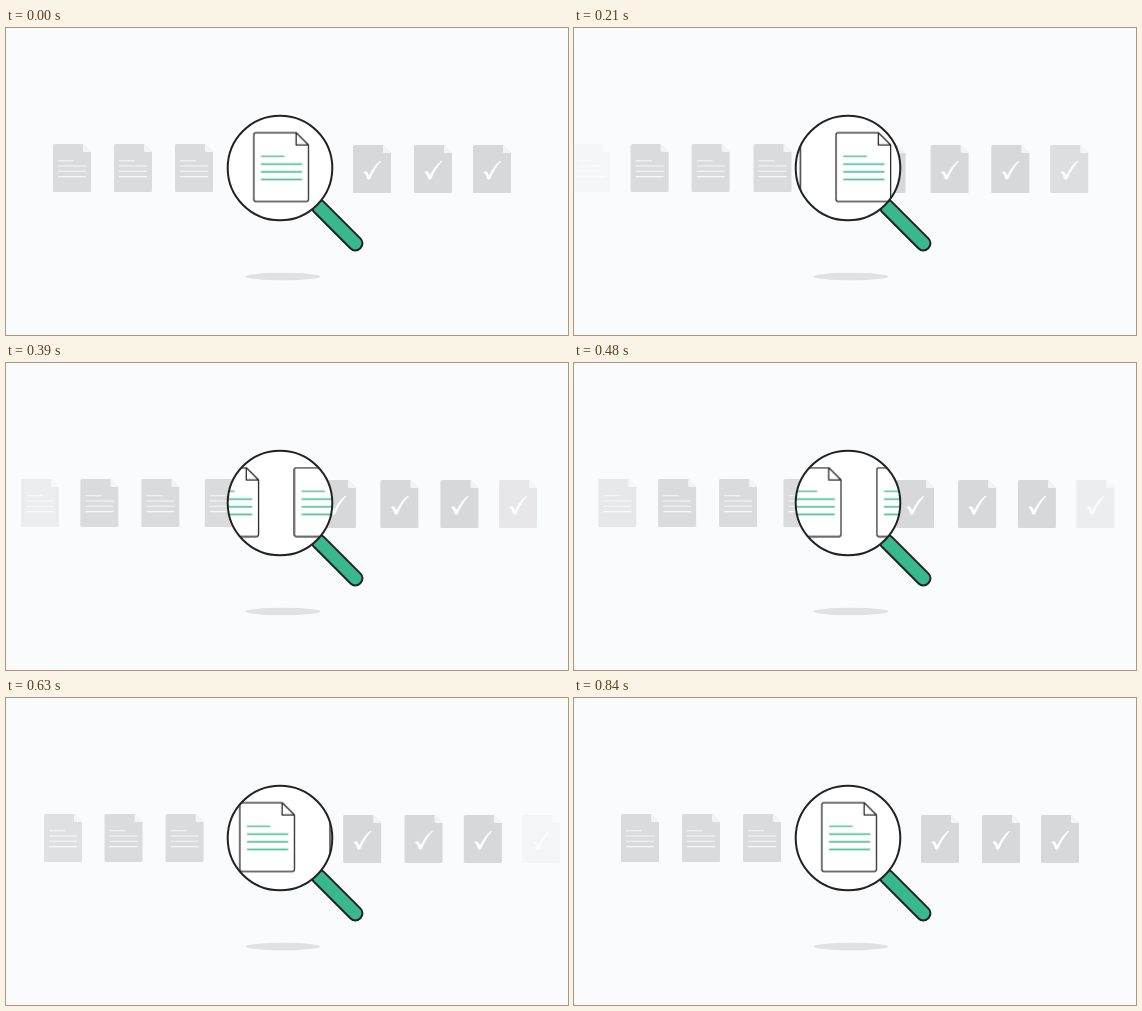
An HTML page that plays this animation: 562x307 px, repeating every 900 ms.

```html
<!DOCTYPE html>
<html lang="en">
<head>
<meta charset="utf-8">
<title>Document check</title>
<style>
  html, body { margin: 0; width: 100%; height: 100%; overflow: hidden; background: #fafbfd; }
  svg { display: block; width: 100vw; height: 100vh; }
  .slide {
    --o: 1;
    --p: 1;
    animation: slide .9s cubic-bezier(.3333, 0, .6667, 1) infinite;
  }
  /* travel for 840 ms, then rest until the loop restarts */
  @keyframes slide {
    0% { transform: translateX(var(--a)); opacity: var(--o); }
    93.333%, 100% { transform: translateX(var(--b)); opacity: var(--p); }
  }
</style>
</head>
<body>
<svg viewBox="0 0 562 307">
  <defs>
    <g id="sheet">
      <path d="M1.5 0H30L38 8V46.5Q38 48 36.5 48H1.5Q0 48 0 46.5V1.5Q0 0 1.5 0Z"/>
      <path d="M30 0V6.7Q30 8 31.3 8H38Z" fill="#f3f4f6"/>
    </g>
    <g id="text">
      <use href="#sheet" fill="#dadbdd"/>
      <path d="M5 16.7H21M5 22H33M5 27.3H33M5 32.6H33" stroke="#f6f7f8" stroke-width="1.1"/>
    </g>
    <g id="done">
      <use href="#sheet" fill="#d7d8da"/>
      <path d="M10.4 27.6Q13.2 25.2 14.4 27.2L16 30.6Q20.500 21 27.300 15.700L28.300 16.300Q21.500 23.500 17.300 33.700Q15.300 35.500 14 33.800Q13.200 29 10.400 27.600Z" fill="#fff"/>
    </g>
    <g id="page" fill="none" stroke-width="1.25">
      <path d="M2 0H42.300L54.600 12.300V66.800Q54.600 68.800 52.600 68.800H2Q0 68.800 0 66.800V2Q0 0 2 0ZM42.300 0V12.300H54.600" stroke="#222" stroke-linejoin="round"/>
      <path d="M7.200 23.600H30.700M7.200 31.500H48.400M7.200 39.200H48.400M7.200 46.800H48.400" stroke="#38b88c" stroke-width="1.400"/>
    </g>
    <clipPath id="glass"><circle cx="274" cy="140" r="52.3"/></clipPath>
  </defs>

  <rect width="562" height="307" fill="#fafbfd"/>
  <ellipse cx="277" cy="248.500" rx="37.300" ry="3.700" fill="#e0e1e3"/>

  <g transform="translate(0 116)">
    <use href="#text" class="slide" style="--a:-11px;--b:47px;--o:0"/>
    <use href="#text" class="slide" style="--a:47px;--b:108px"/>
    <use href="#text" class="slide" style="--a:108px;--b:169px"/>
    <use href="#text" class="slide" style="--a:169px;--b:235.500px"/>
  </g>
  <g transform="translate(0 117)">
    <use href="#done" class="slide" style="--a:283.500px;--b:347px"/>
    <use href="#done" class="slide" style="--a:347px;--b:408px"/>
    <use href="#done" class="slide" style="--a:408px;--b:467px"/>
    <use href="#done" class="slide" style="--a:467px;--b:525px;--p:0"/>
  </g>

  <rect x="48" y="-7" width="65.500" height="14" rx="6.600" transform="translate(274 140) rotate(45)" fill="#38b88c" stroke="#222" stroke-width="2"/>
  <circle cx="274" cy="140" r="52.300" fill="#fff"/>
  <g clip-path="url(#glass)">
    <g transform="translate(0 104.600)">
      <use href="#page" class="slide" style="--a:157.400px;--b:247.800px"/>
      <use href="#page" class="slide" style="--a:247.800px;--b:338.200px"/>
    </g>
  </g>
  <circle cx="274" cy="140" r="52.300" fill="none" stroke="#222" stroke-width="2"/>
</svg>
</body>
</html>
```
